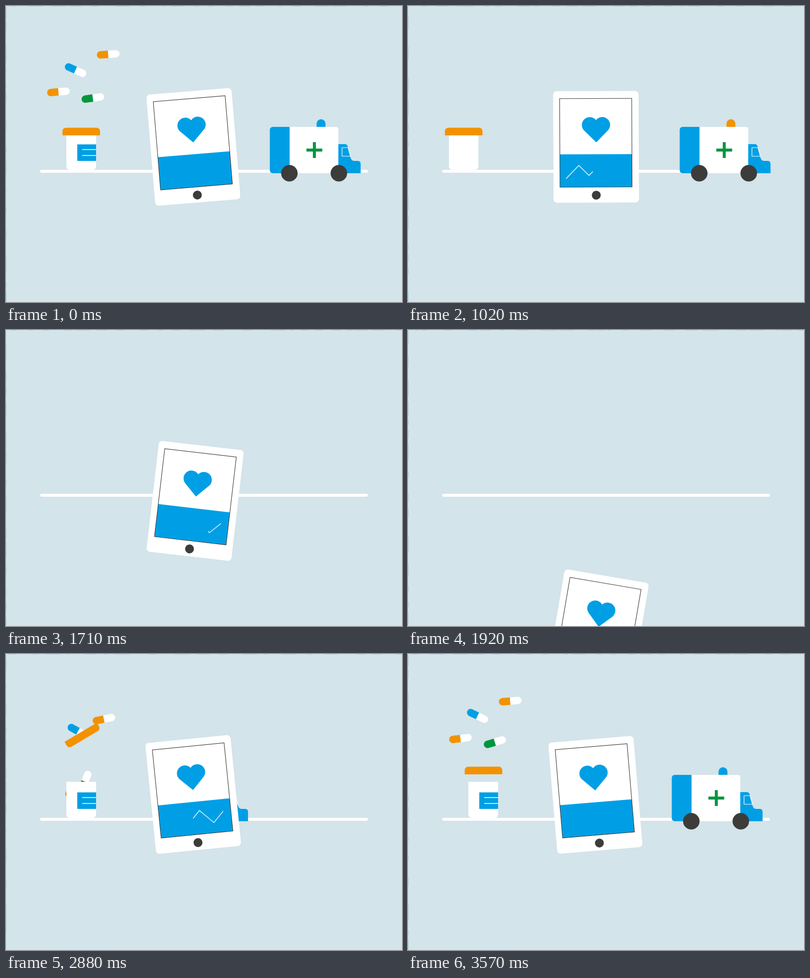
An HTML page with a canvas that plays this animation: 800 by 600 pixels, repeating every 3.6 s.

```html
<!DOCTYPE html>
<html lang="en">
<head>
<meta charset="utf-8">
<title>Digital health</title>
<style>
html, body { margin: 0; width: 100%; height: 100%; overflow: hidden; background: #d3e4ea; }
canvas { display: block; }
</style>
</head>
<body>
<canvas id="stage" width="800" height="600"></canvas>
<script>
const ctx = document.getElementById('stage').getContext('2d');
const LOOP = 3600, STEP = 30;
const BLUE = '#009fe5', ORANGE = '#f39200', GREEN = '#009640', DARK = '#3c3c3b', WHITE = '#fff';
const RAD = Math.PI / 180;

const clamp = v => Math.min(1, Math.max(0, v));
const progress = (s, start, length) => clamp((s - start) / length);
const settle = (s, start, tau) => Math.exp(-(s - start) / tau);

function box(x, y, w, h, color, radii = 0) {
  ctx.fillStyle = color;
  ctx.beginPath();
  ctx.roundRect(x, y, w, h, radii);
  ctx.fill();
}

function disc(x, y, r, color) {
  ctx.fillStyle = color;
  ctx.beginPath();
  ctx.arc(x, y, r, 0, 2 * Math.PI);
  ctx.fill();
}

function poly(points, color, width) {
  ctx.strokeStyle = color;
  ctx.lineWidth = width;
  ctx.beginPath();
  points.forEach(([x, y]) => ctx.lineTo(x, y));
  ctx.stroke();
}

function placed(x, y, degrees, draw) {
  ctx.save();
  ctx.translate(x, y);
  ctx.rotate(degrees * RAD);
  draw();
  ctx.restore();
}

// Each capsule bursts upwards, peaks at -lead, then falls under its own gravity.
const pills = [
  { color: ORANGE, x: 206.5, top: 93.2, fromX: 160, launch: -900, lead: 96, fall: .00052, tilt: -5.8, spin: .000193, twist: -30 },
  { color: BLUE, x: 140.5, top: 117.6, fromX: 164, launch: -870, lead: 150, fall: .00055, tilt: 29, spin: -.0002, twist: 0 },
  { color: GREEN, x: 175.5, top: 158.5, fromX: 153, launch: -748, lead: 200, fall: .0007, tilt: -40, spin: .0008, twist: -40 },
  { color: ORANGE, x: 106, top: 166.5, fromX: 148, launch: -732, lead: 150, fall: .000335, tilt: -10.3, spin: .000235, twist: 10 }
];

function drawPill(pill, s) {
  if (s < pill.launch) return;
  const left = Math.pow(1 - progress(s, pill.launch, -pill.lead - pill.launch), 6.6);
  const drop = Math.max(0, s + pill.lead) ** 2;
  const x = pill.x + (pill.fromX - pill.x) * left;
  const y = pill.top + (300 - pill.top) * left + pill.fall * drop;
  placed(x, y, pill.tilt + pill.twist * left + pill.spin * drop, () => {
    box(-23, -7.5, 23, 15, pill.color, [7.5, 0, 0, 7.5]);
    box(0, -7.5, 23, 15, WHITE, [0, 7.5, 7.5, 0]);
  });
}

function drawPills(s) {
  ctx.save();
  ctx.beginPath();
  ctx.rect(0, 0, 800, 337);
  ctx.clip();
  [...pills].reverse().forEach(pill => drawPill(pill, s));
  ctx.restore();
}

function drawJar(s) {
  const dx = -3 * settle(s, -1080, 58) - 200 * Math.pow(Math.max(0, s - 620) / 600, 4);
  if (dx < -200) return;
  ctx.save();
  ctx.translate(122 + dx, 0);
  ctx.save();
  ctx.beginPath();
  ctx.roundRect(0, 259, 60, 73, [0, 0, 7, 7]);
  ctx.clip();
  box(0, 259, 60, 73, WHITE);
  // The label travels round the jar as it rolls.
  const turn = 188;
  const label = ((22 + 2 * dx + 48) % turn + turn) % turn - 48;
  box(label, 280.5, 48, 33.5, BLUE);
  [291, 303].forEach(y => poly([[label + 10, y], [label + 38, y]], WHITE, 1.5));
  ctx.restore();

  const flight = progress(s, -896, 896);
  const age = flight * 896;
  const lift = flight < 1 ? .63 * age - .000703 * age * age : 0;
  const sway = 5 * Math.sin(Math.PI * flight);
  placed(30 + sway, 254.5 - lift, 360 * (1 - Math.pow(1 - flight, 2.45)), () =>
    box(-38, -7.75, 76, 15.5, ORANGE, [7, 7, 0, 0]));
  ctx.restore();
}

function drawAmbulance(s) {
  const dx = -228 * settle(s, -720, 115) + 117 * Math.pow(Math.max(0, s - 440) / 970, 4)
    + clamp(s / 510) * .5;
  if (dx < -730 || dx > 280) return;
  ctx.save();
  ctx.translate(533.4 + dx, 0);
  box(94.5, 229.5, 18, 18, (s + LOOP + 60) % 600 < 300 ? BLUE : ORANGE, [9, 9, 0, 0]);
  box(0, 245, 41, 94, BLUE, [6, 0, 0, 6]);
  box(40, 245, 98.5, 94, WHITE, [0, 5, 0, 0]);
  box(74, 289, 32, 6, GREEN);
  box(87, 276, 6, 32, GREEN);

  ctx.fillStyle = BLUE;
  ctx.beginPath();
  ctx.moveTo(138.5, 280);
  ctx.lineTo(152, 280);
  ctx.quadraticCurveTo(156, 280, 157.5, 285);
  ctx.lineTo(163, 307);
  ctx.quadraticCurveTo(165, 314, 170, 314);
  ctx.lineTo(178, 314);
  ctx.quadraticCurveTo(183.5, 314, 183.5, 320);
  ctx.lineTo(183.5, 339);
  ctx.lineTo(138.5, 339);
  ctx.fill();
  poly([[146, 287], [158, 287], [163, 304.5], [146, 304.5], [146, 287]], WHITE, 1.2);
  disc(39.5, 339, 16.7, DARK);
  disc(139.5, 339, 16.7, DARK);
  ctx.restore();
}

function drawHeart() {
  ctx.fillStyle = BLUE;
  ctx.beginPath();
  ctx.moveTo(.5, -9);
  ctx.arc(-12.6, -44.4, 16, 135 * RAD, 322 * RAD);
  ctx.arc(12.6, -44.4, 16, 218 * RAD, 405 * RAD);
  ctx.fill();
}

const pulse = [[-60.8, 64.2], [-35, 37.6], [-14.5, 58], [9.2, 33.6], [36, 60.8], [56.8, 39.8]];
const pulseLength = pulse.slice(1).reduce((sum, [x, y], i) =>
  sum + Math.hypot(x - pulse[i][0], y - pulse[i][1]), 0);

function drawPulse(s) {
  const from = progress(s, s < 0 ? -958 : 1310, 500) * pulseLength;
  const to = (s < 0 ? 1 : progress(s, 790, 500)) * pulseLength;
  if (to <= from) return;
  ctx.setLineDash([to - from, 2 * pulseLength]);
  ctx.lineDashOffset = -from;
  poly(pulse, WHITE, 1.3);
  ctx.setLineDash([]);
}

function drawTablet(s) {
  const dy = -171 * settle(s, -1080, 68) + 324.5 * Math.pow(Math.max(0, s - 1490) / 430, 2.5);
  if (Math.abs(dy) > 500) return;
  const age = (s + 1080) ** 2;
  const angle = -5.8 + age * (.82e-6 + 1e-13 * age);
  placed(380, 303.5 + dy, angle, () => {
    ctx.translate(0, -18);
    box(-86.3, -113, 172.6, 226, WHITE, 7);
    box(-73.2, 15, 145.6, 66.5, BLUE);
    ctx.strokeStyle = DARK;
    ctx.lineWidth = 1.1;
    ctx.strokeRect(-73.2, -98, 145.6, 179.5);
    drawHeart();
    drawPulse(s);
    disc(0, 98, 9, DARK);
  });
}

// Faint broken edge along the top and left of the paper.
function drawEdge(t) {
  let seed = 17 + 31 * Math.floor((t + 60) % LOOP / 120);
  const random = () => (seed = (seed * 16807 + 11) % 2147483647) / 2147483647;
  random();
  const strip = (length, draw) => {
    for (let p = random() * 30; p < length;) {
      const size = 6 + random() * 28;
      draw(p, size);
      p += size + 4 + random() * 34;
    }
  };
  strip(795, (p, size) => box(p, 0, size, .8, '#b4c3c9'));
  strip(590, (p, size) => box(0, p, .8, size, '#b4c3c9'));
}

function render(t) {
  const s = t < 2250 ? t : t - LOOP;
  box(0, 0, 800, 600, '#d3e4ea');
  drawEdge(t);
  box(69, 332, 662, 6, WHITE, 3);
  drawPills(s);
  drawAmbulance(s);
  drawJar(s);
  drawTablet(s);
}

const began = performance.now();
function tick() {
  const t = (performance.now() - began) % LOOP;
  render(Math.floor(t / STEP) * STEP);
  requestAnimationFrame(tick);
}
tick();
</script>
</body>
</html>
```
